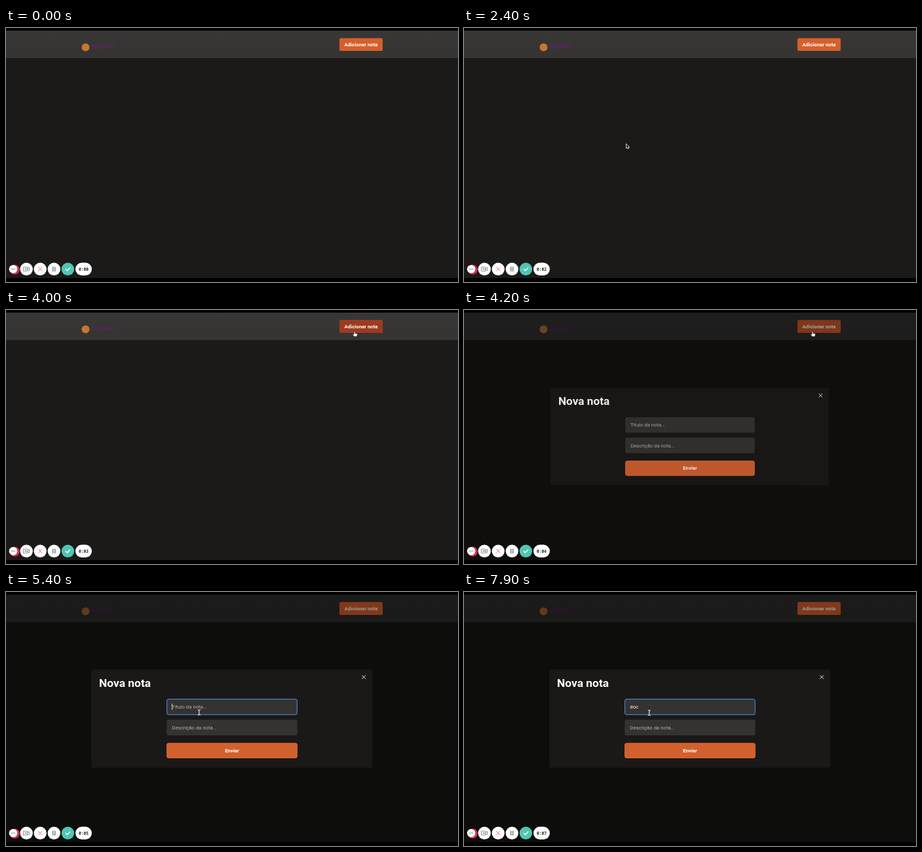
These frames come from a looping animation (690 by 388 pixels, 8000 ms). An HTML page:

```html
<!DOCTYPE html>
<html lang="pt-BR">
<head>
<meta charset="utf-8">
<title>Nova nota</title>
<style>
  html, body { margin: 0; width: 100%; height: 100%; overflow: hidden; background: #000; }
  svg { display: block; width: 690px; height: 388px; }
  text { font: 400 7.75px Roboto, sans-serif; fill: #fff; white-space: pre; }
  .bold { font-weight: 700; }
  .mid { text-anchor: middle; }
  .hint { fill: #b3b1af; }
  .line { fill: none; stroke-width: 1; stroke-linecap: round; stroke-linejoin: round; }
</style>
</head>
<body>
<svg viewBox="0 0 690 388">
  <defs>
    <linearGradient id="bar" x2="0" y2="1">
      <stop stop-color="#393736"/><stop offset="1" stop-color="#353433"/>
    </linearGradient>
  </defs>

  <!-- page -->
  <rect y="4" width="690" height="378" fill="#1b1a18"/>
  <rect y="4" width="690" height="42" fill="url(#bar)"/>
  <circle cx="121.5" cy="29.5" r="6" fill="#c8752f"/>
  <text x="131" y="30.5" style="font-size:9.3px;fill:#6c1c7c">brumelo</text>
  <rect id="shade" y="4" width="690" height="378" fill="#000"/>

  <g>
    <rect x="509" y="15.5" width="66" height="19.5" rx="2.5" fill="#d65f2b"/>
    <rect id="hover" x="509" y="15.5" width="66" height="19.5" rx="2.5" fill="#9d3a1f"/>
    <text class="bold mid" x="542" y="28.3">Adicionar nota</text>
    <rect id="dim" x="509" y="15.5" width="66" height="19.5" rx="2.5" fill="#000"/>
  </g>

  <!-- dialog -->
  <g id="modal">
    <rect x="130.3" y="118.5" width="428.7" height="150" rx="3" fill="#1a1917"/>
    <text class="bold" x="142" y="145" style="font-size:17.4px">Nova nota</text>
    <path class="line" stroke="#e4e4e4" d="M543.7 127.5l5 5m0-5l-5 5"/>
    <rect x="245.3" y="163.5" width="199.4" height="24" rx="2.5" fill="#343332"/>
    <rect id="ring" class="line" x="245.6" y="163.7" width="198.8" height="23.6" rx="2.5" stroke="#4b8fe8"/>
    <text id="title" x="253.3" y="178"></text>
    <rect id="caret" x="253" y="170.5" width=".8" height="9.5" fill="#fff"/>
    <rect x="245.3" y="195" width="199.4" height="24" rx="2.5" fill="#343332"/>
    <text class="hint" x="253.3" y="209.8">Descrição da nota...</text>
    <rect x="245.6" y="231" width="198.8" height="22.5" rx="2.5" fill="#d1602d" stroke="#f0683c" stroke-width=".9"/>
    <text class="bold mid" x="345" y="244.8">Enviar</text>
  </g>

  <!-- recorder controls -->
  <circle cx="13.3" cy="369" r="7.5" fill="#dc2850"/>
  <g fill="#fff">
    <circle cx="11" cy="368.3" r="6.3"/>
    <circle cx="31.2" cy="368.3" r="9.7"/>
    <circle cx="52.2" cy="368.3" r="9.7"/>
    <circle cx="73.3" cy="368.3" r="9.7"/>
    <rect x="106" y="358.6" width="25" height="19.4" rx="9.7"/>
  </g>
  <circle cx="94.4" cy="368.3" r="9.7" fill="#50c6b2"/>
  <g fill="#555">
    <circle cx="8.8" cy="368.3" r=".7"/><circle cx="11" cy="368.3" r=".7"/><circle cx="13.2" cy="368.3" r=".7"/>
  </g>
  <g class="line" style="stroke-width:.8">
    <path stroke="#747b80" d="M26.8 365.3h6v6h-6zM32.8 367.5l2.8-1.8v5.2l-2.8-1.8"/>
    <circle cx="29.8" cy="368.3" r="1" stroke="#747b80"/>
    <path stroke="#e0527a" d="M49.2 365.3l6 6m0-6l-6 6"/>
    <path stroke="#4a4f55" style="stroke-width:1.1" d="M71.8 365v6.6m3-6.6v6.6"/>
    <path stroke="#fff" style="stroke-width:1.3" d="M91.2 368.5l2.3 2.3 4.3-4.6"/>
  </g>
  <text id="clock" class="mid" x="118.5" y="370.6" style="font:600 6.2px 'Noto Sans Mono',monospace;fill:#2b2b2b"></text>

  <!-- pointer, each shape with its hot spot at 0,0 -->
  <g id="pointer" stroke-linejoin="round">
    <path id="arrow" d="M0 0v7l1.6-1.4 1.1 2.3 1.2-.6-1-2.2H5z" fill="#111" stroke="#fff" stroke-width=".8"/>
    <path id="hand" d="M-.8.7Q0-.4.8.7V3l3 .8q.7.3.5 1.2L3.6 8H-.4L-3 4.8q.3-.9 1.2-.4l1 .7z" fill="#fff" stroke="#222" stroke-width=".5"/>
    <path id="beam" class="line" stroke="#fff" d="M-1.7-4Q0-4 0-3 0-4 1.7-4M0-3V3M-1.7 4Q0 4 0 3 0 4 1.7 4"/>
  </g>
</svg>
<script>
const LOOP = 8000;
const el = id => document.getElementById(id);
const ease = p => p * p * (3 - 2 * p);

// rows: [time, value, ...]
const path = [
  [900, 420, 185], [1500, 536, 25.5], [1900, 536, 25.5], [2350, 247.6, 176.8],
  [2900, 247.6, 176.8], [3600, 532, 32.5], [4600, 532, 32.5], [5200, 294.8, 184],
  [5700, 294.8, 184], [6050, 282.8, 184.5]
];
const hover = [[1550, 0], [1800, 1], [1950, 1], [2350, 0], [3550, 0], [3800, 1], [4100, 1], [4250, 0]];
const open = [[4100, 0], [4220, .97], [4400, 1]];
const shapes = [[0, ''], [900, 'arrow'], [1500, 'hand'], [1950, 'arrow'], [3550, 'hand'],
  [4650, 'arrow'], [5100, 'beam'], [6600, ''], [7900, 'beam']];
const typed = [[0, ''], [6600, 'd'], [7400, 'do'], [7800, 'doc']];
const caret = [[0, 0], [5200, 1], [5700, 0], [6100, 1], [6600, 0]];

const step = (rows, t) => rows.filter(r => r[0] <= t).pop()[1];

function tween(rows, t, col = 1) {
  const i = rows.findIndex(r => r[0] > t);
  if (i === 0) return rows[0][col];
  if (i < 0) return rows[rows.length - 1][col];
  const a = rows[i - 1], b = rows[i];
  return a[col] + (b[col] - a[col]) * ease((t - a[0]) / (b[0] - a[0]));
}

const show = (id, amount) => el(id).setAttribute('opacity', Number(amount));

function draw(t) {
  const shown = tween(open, t);
  show('shade', shown * .5);
  show('dim', shown * .4);
  show('hover', tween(hover, t));
  show('modal', shown);
  const scale = .9 + .1 * shown;
  el('modal').setAttribute('transform',
    `translate(344.7 193.5) scale(${scale}) translate(-344.7 -193.5)`);

  const text = step(typed, t);
  el('title').textContent = text || 'Título da nota...';
  el('title').classList.toggle('hint', !text);
  show('ring', t >= 5200);
  show('caret', step(caret, t));

  el('clock').textContent = '0:0' + Math.max(0, Math.floor((t - 100) / 1000));

  const shape = step(shapes, t);
  for (const id of ['arrow', 'hand', 'beam']) show(id, id === shape);
  el('pointer').setAttribute('transform', `translate(${tween(path, t)} ${tween(path, t, 2)})`);
}

const start = performance.now();
function frame() {
  draw((performance.now() - start) % LOOP);
  requestAnimationFrame(frame);
}
frame();
</script>
</body>
</html>
```
